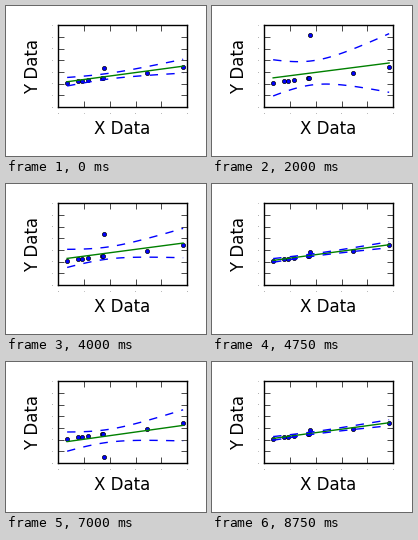
A matplotlib script for the animation above (9000 ms loop, 200 px wide and 150 px high).

```python
import numpy as np
import matplotlib.pyplot as plt
from matplotlib.animation import FuncAnimation

W, H, DPI = 200, 150, 100
FRAMES, INTERVAL = 36, 250
LEFT, RIGHT, TOP, BOTTOM = 52.4, 181, 19.4, 101
T95 = 2.365  # two-sided 95 % Student t, 7 degrees of freedom

x = np.array([0.34, 0.76, 0.92, 1.15, 1.71, 1.745, 1.78, 3.44, 4.85])
base = np.array([2.09, 2.21, 2.22, 2.31, 2.47, 2.48, 3.36, 2.94, 3.46])
OUTLIER, SWING = 6, 2.86
grid = np.linspace(x[0], x[-1], 100)


def fit(y):
    """Least-squares line and half-width of its confidence band."""
    slope, icept = np.polyfit(x, y, 1)
    n, dx = len(x), x - x.mean()
    s = np.sqrt(np.sum((y - slope * x - icept) ** 2) / (n - 2))
    half = T95 * s * np.sqrt(1 / n + (grid - x.mean()) ** 2 / np.sum(dx ** 2))
    return slope * grid + icept, half


plt.rcParams.update({"font.family": "DejaVu Sans", "font.size": 12,
                     "axes.linewidth": 1.0})
fig = plt.figure(figsize=(W / DPI, H / DPI), dpi=DPI, facecolor="white")
ax = fig.add_axes([LEFT / W, 1 - BOTTOM / H,
                   (RIGHT - LEFT) / W, (BOTTOM - TOP) / H])
ax.set(xlim=(0, 5), ylim=(0, 7), xticks=range(6), yticks=range(8))
ax.tick_params(direction="in", length=4, width=0.5, pad=4, top=True,
               right=True, labelsize=1)

label = dict(ha="center", va="baseline", rotation_mode="anchor")
fig.text(116.5 / W, 1 - 128 / H, "X Data", **label)
fig.text(32 / W, 1 - 60 / H, "Y Data", rotation=90, **label)

dots, = ax.plot([], [], ".", color="blue", ms=6, mec="black", mew=0.5)
line, = ax.plot([], [], color="green", lw=1)
upper, lower = (ax.plot([], [], color="blue", lw=1, ls=(0, (6, 6)),
                        dash_capstyle="butt")[0] for _ in range(2))


def draw(i):
    y = base.copy()
    y[OUTLIER] += SWING * np.sin(2 * np.pi * i / FRAMES)
    mid, half = fit(y)
    dots.set_data(x, y)
    line.set_data(grid, mid)
    upper.set_data(grid, mid + half)
    lower.set_data(grid, mid - half)
    return dots, line, upper, lower


anim = FuncAnimation(fig, draw, frames=FRAMES, interval=INTERVAL,
                     repeat=True, repeat_delay=0)
plt.show()
```
